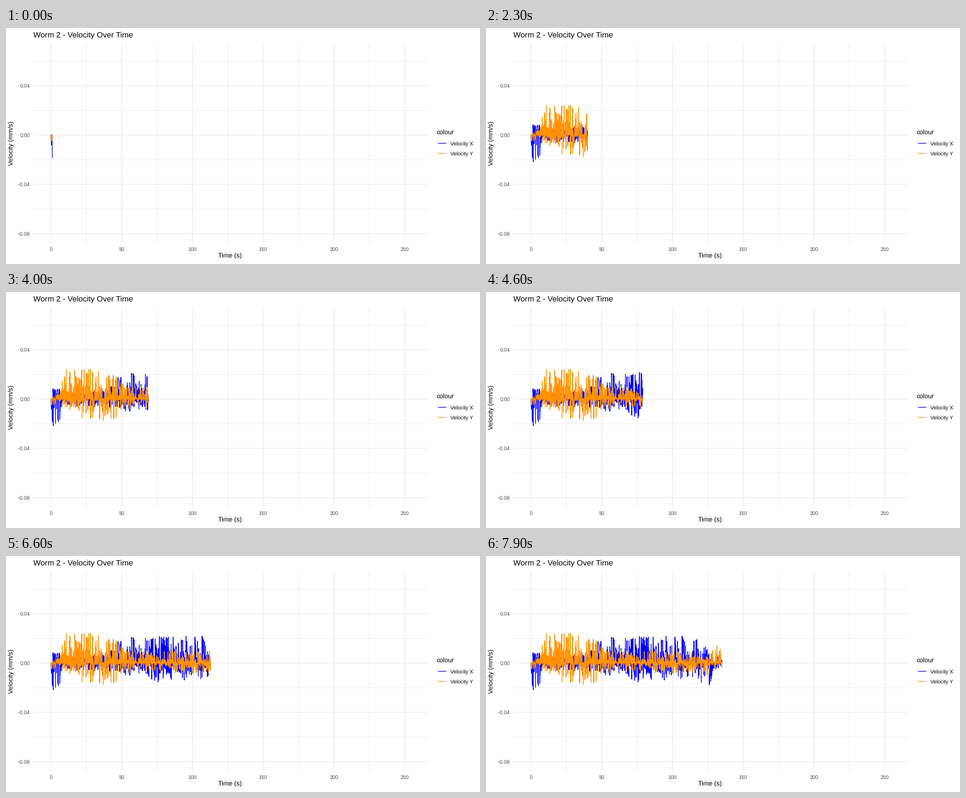
A matplotlib script that plays this animation: 800 px wide and 400 px high, repeating every 8 s.

```python
import numpy as np
import matplotlib.pyplot as plt
from matplotlib.animation import FuncAnimation

plt.rcParams.update({"font.family": "Liberation Sans",
                     "text.hinting": "no_hinting",
                     "path.simplify": False})

W, H, DPI = 800, 400, 100
FRAMES, INTERVAL = 80, 100
PT = 72 / DPI
BLUE, ORANGE, GRID = "#0000ff", "#ff9200", "#ebebeb"
LEFT, RIGHT, TOP, BOTTOM = 45.7, 710.7, 26, 365
X0, X_SCALE = 75.9, 2.388
Y0, Y_SCALE = 181.5, 2087.5
DT, T_END = 0.1, 136
T_FIRST, T_STEP = 1, 1.696


def px(t):
    return X0 + X_SCALE * t


def py(v):
    return Y0 - Y_SCALE * v


fig = plt.figure(figsize=(W / DPI, H / DPI), dpi=DPI, facecolor="white")
ax = fig.add_axes([0, 0, 1, 1])
ax.set_xlim(0, W)
ax.set_ylim(H, 0)
ax.axis("off")


def stroke(xs, ys, color, width=1.07, z=1):
    return ax.plot(xs, ys, color=color, lw=width * PT, zorder=z, snap=False,
                   solid_capstyle="butt", solid_joinstyle="round")[0]


def label(x, y, s, size=8.8, color="black", ha="left", rotation=0):
    ax.text(x, y, s, fontsize=size * PT, color=color, ha=ha, va="baseline",
            rotation=rotation, rotation_mode="anchor")


def draw_grid():
    for t in range(25, 251, 50):
        stroke([px(t)] * 2, [TOP, BOTTOM], GRID, 0.8)
    for v in (-0.06, -0.02, 0.02, 0.06):
        stroke([LEFT, RIGHT], [py(v)] * 2, GRID, 0.8)
    for t in range(0, 251, 50):
        stroke([px(t)] * 2, [TOP, BOTTOM], GRID, 1.2)
        label(px(t), 378.2, str(t), color="#4d4d4d", ha="center")
    for v in (-0.08, -0.04, 0, 0.04):
        stroke([LEFT, RIGHT], [py(v)] * 2, GRID, 1.2)
        label(41, py(v) + 3.4, f"{v:.2f}", color="#4d4d4d", ha="right")


def draw_text():
    label(45.7, 16.2, "Worm 2 - Velocity Over Time", 13.2)
    label(378.3, 390.2, "Time (s)", 11, ha="center")
    label(13.2, 195.8, "Velocity (mm/s)", 11, ha="center", rotation=90)
    label(727, 181.2, "colour", 11)
    for y, name, color in ((195.4, "X", BLUE), (212.6, "Y", ORANGE)):
        stroke([729, 743], [y, y], color)
        label(749.8, y + 3.3, f"Velocity {name}")


def series(seed, bias, start, envelope):
    """Spiky noise between bounds given as (s, up, down) in 0.001 mm/s."""
    rng = np.random.default_rng(seed)
    t = np.arange(0, T_END, DT)
    knots, up, down = np.transpose(envelope)
    size = rng.random(t.size) ** 3
    rise = rng.random(t.size) < bias
    v = size * np.where(rise, np.interp(t, knots, up),
                        -np.interp(t, knots, down))
    # The opening wobble runs through a few fixed points.
    opening = t <= T_FIRST
    v[opening] = np.interp(t[opening], np.linspace(0, T_FIRST, len(start)),
                           start)
    return px(t), py(v / 1000)


vx = series(4, 0.55, [0, -9, 2.5, -18.5],
            [(0, 9, 24), (6, 9, 24), (8, 4, 6), (40, 8, 7), (50, 21, 9),
             (72, 22, 16), (115, 22, 12), (126, 12, 20), (130, 6, 5),
             (136, 5, 4)])
vy = series(11, 0.6, [0, -6, 0, -5.5, 0],
            [(0, 2, 6), (6, 6, 4), (10, 24, 9), (30, 27, 20), (45, 22, 17),
             (52, 11, 7), (110, 11, 9), (125, 5, 12), (131, 16, 5),
             (136, 9, 7)])

draw_grid()
draw_text()
curves = [(stroke([], [], BLUE, z=3), *vx), (stroke([], [], ORANGE, z=4), *vy)]


def update(i):
    end = px(T_FIRST + T_STEP * i)
    for line, x, y in curves:
        n = np.searchsorted(x, end)
        line.set_data(np.append(x[:n], end),
                      np.append(y[:n], np.interp(end, x, y)))
    return [c[0] for c in curves]


anim = FuncAnimation(fig, update, frames=FRAMES, interval=INTERVAL,
                     init_func=lambda: update(0), repeat=True,
                     repeat_delay=0, blit=False)
plt.show()
```
